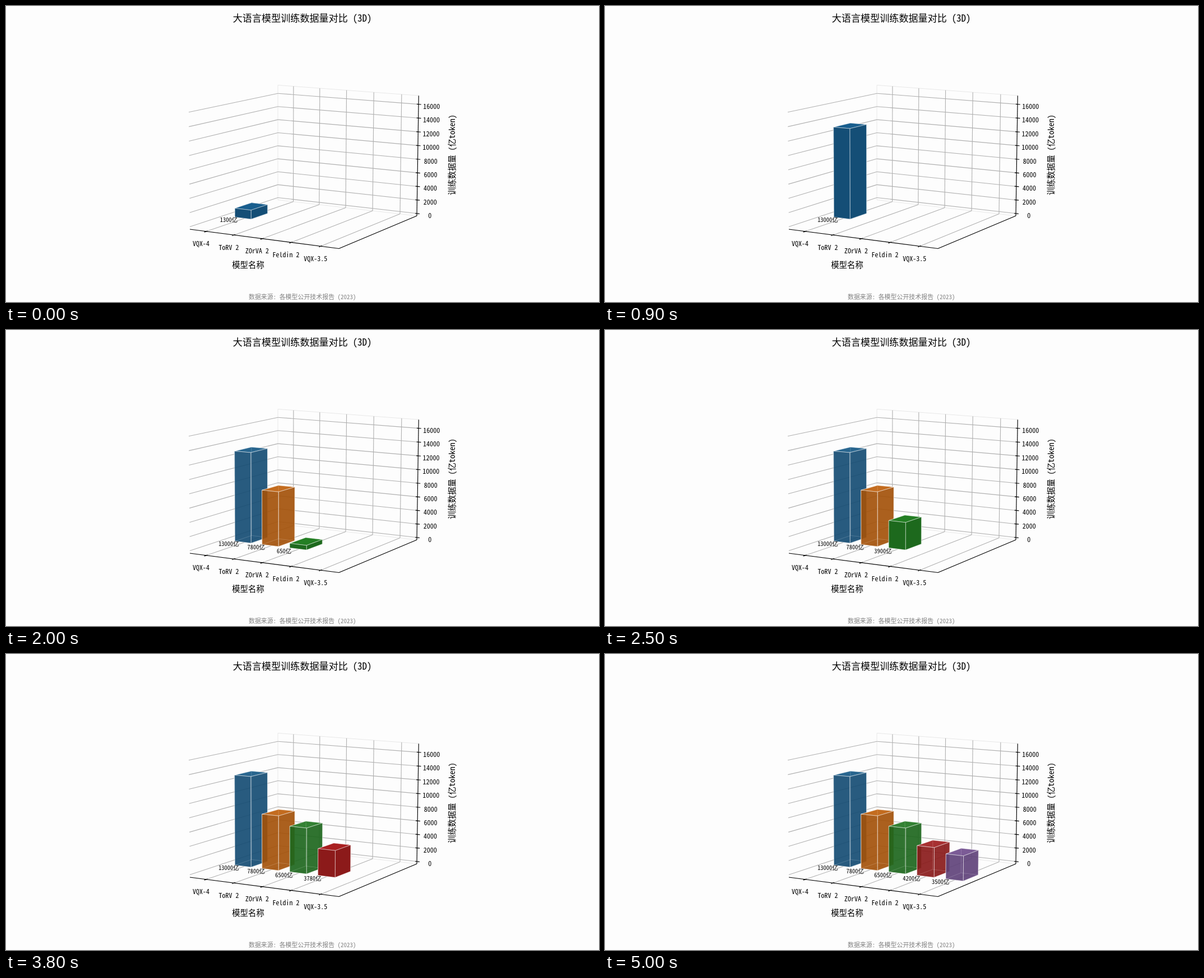
Animation of 1058 by 529 pixels, one loop 5500 ms. Source, as an HTML page:

```html
<!DOCTYPE html>
<html lang="zh">
<head>
<meta charset="utf-8">
<title>大语言模型训练数据量对比</title>
<style>
  html, body { margin: 0; width: 100%; height: 100%; overflow: hidden; background: #fdfdfd; }
  svg { display: block; width: 100%; height: 100%; }
  text {
    font-family: "Noto Sans Mono CJK SC", "Noto Sans CJK SC", "Noto Sans CJK", monospace;
    text-anchor: middle;
    white-space: pre;
  }
  .grid { stroke: #b0b0b0; stroke-width: 1.1; }
  .pane { stroke: #e8e8e8; stroke-width: 1; }
  .axis { stroke: #000; stroke-width: 1.15; }
  polygon { stroke: #fff; stroke-width: .7; stroke-linejoin: round; }
</style>
</head>
<body>
<svg id="stage" viewBox="0 0 1058 529">
  <g id="frame"></g>
  <g id="bars"></g>
  <g id="labels"></g>
</svg>
<script>
const NS = 'http://www.w3.org/2000/svg';
const LOOP = 5500, STEP = 100, STEPS = 10;
const Z_MAX = 16900, Z_PAD = Z_MAX / 48;

const models = [
  { name: 'VQX-4', value: 13000, rgb: [31, 119, 180] },
  { name: 'ToRV 2', value: 7800, rgb: [255, 127, 14] },
  { name: 'ZOrVA 2', value: 6500, rgb: [44, 160, 44] },
  { name: 'Feldin 2', value: 4200, rgb: [214, 39, 40] },
  { name: 'VQX-3.5', value: 3500, rgb: [148, 103, 189] }
];

const byId = id => document.getElementById(id);
const frame = byId('frame'), barLayer = byId('bars'), labelLayer = byId('labels');

function add(parent, tag, attrs) {
  const el = document.createElementNS(NS, tag);
  for (const key in attrs) el.setAttribute(key, attrs[key]);
  return parent.appendChild(el);
}

function addText(parent, str, x, y, size, extra) {
  const el = add(parent, 'text', { x, y, dy: '.37em', 'font-size': size, ...extra });
  el.textContent = str;
  return el;
}

// Perspective camera over a unit box: columns for x, y, z and the front-left corner.
const point = (u, v, w) => [u * w, v * w, w];
const origin = point(328, 399, 1);
const xAxis = point(594, 433.5, 0.9482).map((c, k) => c - origin[k]);
const yAxis = point(485, 346.5, 1.1016).map((c, k) => c - origin[k]);
const zAxis = [-6.5, -227.8, -0.0135];

function project(x, y, z) {
  const [u, v, w] = origin.map((c, k) => c + x * xAxis[k] + y * yAxis[k] + z * zAxis[k]);
  return [u / w, v / w];
}

const toX = x => (x + 0.604) / 5.208;
const toZ = z => (z + Z_PAD) / (Z_MAX + 2 * Z_PAD);

function line(cls, a, b) {
  const [x1, y1] = project(...a), [x2, y2] = project(...b);
  add(frame, 'line', { class: cls, x1, y1, x2, y2 });
}

function drawFrame() {
  line('pane', [0, 1, 0], [0, 1, 1]);
  line('pane', [0, 1, 1], [1, 1, 1]);
  line('pane', [0, 1, 0], [1, 1, 0]);

  models.forEach((m, i) => {
    const x = toX(i);
    line('grid', [x, 0, 0], [x, 1, 0]);
    line('grid', [x, 1, 0], [x, 1, 1]);
  });
  for (let v = 0; v <= 16000; v += 2000) {
    const z = toZ(v);
    line('grid', [0, 0, z], [0, 1, z]);
    line('grid', [0, 1, z], [1, 1, z]);
  }

  line('axis', [0, 0, 0], [1, 0, 0]);
  line('axis', [1, 0, 0], [1, 1, 0]);
  line('axis', [1, 1, 0], [1, 1, 1]);

  models.forEach((m, i) => {
    const x = toX(i), [u, v] = project(x, 0, 0);
    line('axis', [x, -0.022, 0], [x, 0.012, 0]);
    addText(frame, m.name, u - 9.4, v + 21.9, 12);
  });
  for (let v = 0; v <= 16000; v += 2000) {
    const z = toZ(v), [px, py] = project(1, 1, z);
    line('axis', [0.988, 1, z], [1.018, 1, z]);
    addText(frame, v, px + 23.3, py + 3.5, 12);
  }

  addText(frame, '大语言模型训练数据量对比 (3D)', 528.7, 22, 17.1);
  addText(frame, '模型名称', 432, 463, 14.4);
  addText(frame, '训练数据量 (亿token)', 0, 0, 14.4, { transform: 'translate(795.5 266) rotate(-90)' });
  addText(frame, '数据来源: 各模型公开技术报告 (2023)', 528.7, 520, 10.95, { fill: '#808080' });
}

// Corner codes are x, y, z bits; hidden faces come first.
const faces = [
  { corners: ['000', '100', '110', '010'], shade: 0.6 },
  { corners: ['010', '110', '111', '011'], shade: 0.6 },
  { corners: ['000', '010', '011', '001'], shade: 0.6 },
  { corners: ['001', '101', '111', '011'], shade: 0.79 },
  { corners: ['100', '110', '111', '101'], shade: 0.655 },
  { corners: ['000', '100', '101', '001'], shade: 0.655 }
];

function makeBar(m, i) {
  const group = add(barLayer, 'g', {});
  const polys = faces.map(f => add(group, 'polygon', {
    fill: `rgb(${m.rgb.map(c => Math.round(c * f.shade))})`
  }));
  const label = addText(labelLayer, '', 397.5 + 48.3 * i + 0.5 * i * i, 382 + 6.4 * i, 10.5);
  const left = i * 1.005 - 0.165;
  const xs = [toX(left), toX(left + 0.6)], ys = [0.357, 0.547];

  return step => {
    const shown = step >= 0;
    group.style.display = label.style.display = shown ? '' : 'none';
    if (!shown) return;
    const value = m.value * Math.min(step + 1, STEPS) / STEPS;
    const zs = [toZ(0), toZ(value)];
    const done = step >= STEPS;
    faces.forEach((f, k) => {
      const pts = f.corners.map(([x, y, z]) =>
        project(xs[x], ys[y], zs[z]).map(c => c.toFixed(2)).join());
      polys[k].setAttribute('points', pts.join(' '));
      polys[k].setAttribute('fill-opacity', done ? 0.7 : 1);
      polys[k].setAttribute('stroke-opacity', done ? 0.7 : 0.75);
    });
    label.textContent = Math.round(value) + '亿';
  };
}

drawFrame();
const bars = models.map(makeBar);
let last = -1;

function render(now) {
  const tick = Math.min(Math.floor(now % LOOP / STEP), models.length * STEPS);
  if (tick !== last) {
    bars.forEach((update, i) => update(tick - i * STEPS));
    last = tick;
  }
}

const start = performance.now();
function loop() {
  render(performance.now() - start);
  requestAnimationFrame(loop);
}
loop();
</script>
</body>
</html>
```
